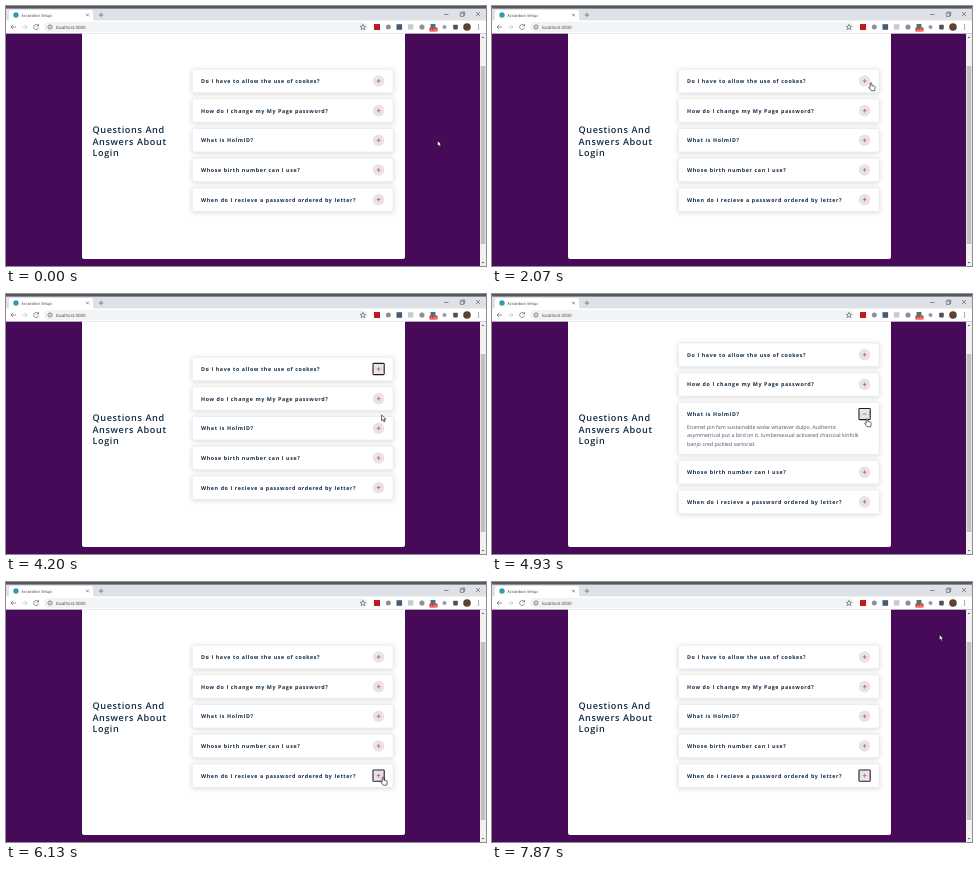
These frames come from a looping animation (480x260 px, 7.94 s). An HTML page:

```html
<!DOCTYPE html>
<html lang="en">
<head>
<meta charset="utf-8">
<title>Accordion Setup</title>
<style>
  html, body { margin: 0; width: 100%; height: 100%; overflow: hidden; background: #470a58; }
  svg { display: block; width: 480px; height: 260px; }
  text { font-family: "Open Sans", "Noto Sans", sans-serif; text-rendering: geometricPrecision; white-space: pre; }
  .chrome text { font-size: 4.4px; fill: #3c4043; }
  .line { fill: none; stroke: #5f6368; stroke-width: .7; }
  .title { font-size: 9.12px; font-weight: 600; letter-spacing: .6px; fill: #102a42; }
  .question { font-size: 5.32px; font-weight: 700; letter-spacing: .6px; fill: #102a42; }
  .answer { font-size: 5.32px; fill: #4a5568; }
  .card { fill: #fff; stroke: #e6e8ee; stroke-width: .7; filter: drop-shadow(0 1.9px 2.6px rgba(0, 0, 0, .14)); }
  .icon { fill: none; stroke: #b44a82; stroke-width: .7; }
  .focus { fill: none; stroke: #1c1a22; stroke-width: 1.1; }
  .pointer { fill: #fff; stroke: #000; stroke-width: .6; stroke-linejoin: round; }
</style>
</head>
<body>
<svg viewBox="0 0 480 260">
  <rect width="480" height="260" fill="#470a58"/>
  <path d="M76 27H399V251q0 2-2 2H78q-2 0-2-2Z" fill="#fff"/>
  <g class="title">
    <text x="86.5" y="127.2">Questions And</text>
    <text x="86.5" y="138.8">Answers About</text>
    <text x="86.5" y="150.4">Login</text>
  </g>
  <g id="cards"></g>

  <g class="chrome">
    <rect width="480" height="15" fill="#dee1e6"/>
    <rect width="480" height="2.6" fill="#55585f"/>
    <path d="M1 15q2 0 2-2V6q0-2 2-2H85q2 0 2 2V13q0 2 2 2Z" fill="#fff"/>
    <rect y="14.5" width="480" height="12.8" fill="#fff"/>
    <rect y="27" width="480" height=".6" fill="#dcdde0"/>
    <circle cx="10" cy="9" r="2.7" fill="#2a9db5"/>
    <text x="15.3" y="10.6" style="font-size:4px">Accordion Setup</text>
    <path class="line" d="M80.2 7.7l2.6 2.6m0-2.6l-2.6 2.6M95 6.6v4.8M92.6 9h4.8M438 8.5h4.5M454.3 7h3.4v3.4h-3.4ZM455.3 7V6h3.4v3.4h-1M470 6l4 4m0-4l-4 4"/>
    <path class="line" d="M10 21H5m2.2-2.2L5 21l2.2 2.2M32.2 19.6A2.5 2.5 0 1 0 32.6 21.6M32.5 18v2h-2"/>
    <path class="line" d="M16 21h5m-2.2-2.2L21 21l-2.2 2.2" style="stroke:#c0c2c5"/>
    <rect x="38" y="16" width="324" height="10" rx="5" fill="#f1f3f4"/>
    <circle class="line" cx="44" cy="21" r="2.1"/>
    <path class="line" d="M44 20.6v1.5M44 19.5v.5"/>
    <text x="50" y="22.7">localhost:3000</text>
    <path class="line" d="M357 18.3l.8 1.9 2 .1-1.6 1.3.6 2-1.8-1.1-1.8 1.1.6-2-1.6-1.3 2-.1Z"/>
    <rect x="368" y="18" width="6" height="6" fill="#c4161c"/>
    <circle cx="382.3" cy="21" r="2.5" fill="#8a9199"/>
    <rect x="390.5" y="18.2" width="5.6" height="5.6" fill="#3e5c7c"/>
    <rect x="402" y="18.2" width="5.4" height="5.4" fill="#c9cbce"/>
    <circle cx="416" cy="21" r="2.6" fill="#8c9094"/>
    <rect x="424.5" y="18" width="5" height="4" fill="#3b7f84"/>
    <rect x="423.5" y="21.6" width="8" height="4" rx=".6" fill="#d0342c"/>
    <text x="424.4" y="24.9" style="font-size:3.4px;fill:#fff">2.6k</text>
    <circle cx="438.5" cy="21" r="2" fill="#969a9f"/>
    <rect x="447.2" y="18.8" width="4.6" height="4.6" rx=".8" fill="#4d5156"/>
    <circle cx="461" cy="21" r="3.8" fill="#5d4032"/>
    <path d="M472.5 18.5v5" stroke="#5f6368" stroke-width="1.1" stroke-dasharray="1.1 .85"/>
  </g>

  <rect x="474" y="27.5" width="6" height="233" fill="#f1f1f1"/>
  <rect x="474.7" y="60" width="4.6" height="178" fill="#c1c1c1"/>
  <path d="M475.6 32l1.4-1.6 1.4 1.6ZM475.6 256l1.4 1.6 1.4-1.6Z" fill="#606060"/>
  <path id="pointer" class="pointer"/>
</svg>
<script>
const LOOP = 7940, FRAME = 1000 / 15;
const LINE = 8.5, HEADER = 23.6, PITCH = 29.65, MIDDLE = 134.3, BUTTON_X = 372.6;
const ARROW = 'M0 0V5.8L1.4 4.6 2.4 6.8 3.4 6.3 2.5 4.2H4.3Z';
const HAND = 'M-.8.6Q0-.5.8.6V3L3.3 3.6q1 .3.9 1.4L3.7 8.2H.2L-2.3 4.9q.3-1 1.5-.2Z';

const items = [
  { question: 'Do I have to allow the use of cookes?', open: [2530, 3530], focus: [2470, 4470],
    answer: ['Unicorn vinyl poutine brooklyn, next level direct trade iceland. Shaman',
      'copper mug church-key coloring book, whatever poutine normcore fixie',
      'cred fernwhistle post-ironic street art.'] },
  { question: 'How do I change my My Page password?' },
  { question: 'What is HolmID?', open: [4530, 5330], focus: [4470, 6130],
    answer: ['Enamel pin fam sustainable woke whatever dulpo. Authentic',
      'asymmetrical put a bird on it. lumbersexual activated charcoal kinfolk',
      'banjo cred pickled sartorial.'] },
  { question: 'Whose birth number can I use?' },
  { question: 'When do I recieve a password ordered by letter?', open: [6200, 7130], focus: [6130, LOOP],
    answer: ['Locavore morvell fashion axe live-edge velour irony synth af tilde shabby',
      'chic man braid chillwave waistcoat copper mug messenger bag. Banjo',
      'snackwave blog, microdosing cloudotters migas vaporware viral lo-fi',
      'seitan'] }
];

// Pointer stops: time, x, y
const stops = [
  [0, 431.4, 134.5], [600, 431.4, 134.5], [730, 431, 134], [1270, 431, 134],
  [2070, 379, 76.5], [2330, 375, 74], [2800, 375, 74], [3330, 373, 59], [3600, 373, 59],
  [4400, 376, 132], [4530, 376, 132], [4870, 375, 124.5], [5330, 375, 124.5],
  [6070, 377, 195], [6200, 377, 195], [6800, 372.6, 178.6], [6870, 372, 178.2], [7130, 372, 178.2],
  [7870, 447.3, 52.5], [LOOP, 447.3, 52.5]
];

const cards = document.getElementById('cards');
const pointer = document.getElementById('pointer');
const within = (t, span) => !!span && t >= span[0] && t < span[1];
const show = (node, visible) => node.style.display = visible ? '' : 'none';

for (const item of items) {
  const lines = item.answer || [];
  item.extra = lines.length * LINE + 3;
  cards.insertAdjacentHTML('beforeend', `<g>
    <rect class="card" x="186.3" width="201" rx="1.2"/>
    <text class="question" x="195" y="13.8">${item.question}</text>
    <g class="answer">${lines.map((line, i) =>
      `<text x="195" y="${26.5 + i * LINE}">${line}</text>`).join('')}</g>
    <g transform="translate(${BUTTON_X} ${HEADER / 2})">
      <circle r="5.8" fill="#eae1e9"/>
      <path class="icon" d="M-1.9 0H1.9"/>
      <path class="icon plus" d="M0-1.9V1.9"/>
      <rect class="focus" x="-5.6" y="-5.6" width="11.2" height="11.2" rx=".8"/>
    </g></g>`);
  item.node = cards.lastElementChild;
  for (const name of ['card', 'answer', 'plus', 'focus']) item[name + 'Node'] = item.node.querySelector('.' + name);
}

function pointerAt(t) {
  const i = stops.findIndex(stop => stop[0] > t);
  const [t0, x0, y0] = stops[i - 1], [t1, x1, y1] = stops[i];
  const u = (t - t0) / (t1 - t0), e = u * u * (3 - 2 * u);
  return [x0 + (x1 - x0) * e, y0 + (y1 - y0) * e];
}

function draw(t) {
  const [px, py] = pointerAt(t);
  const opened = items.find(item => within(t, item.open));
  let y = MIDDLE - 2 * PITCH - HEADER / 2 - (opened ? opened.extra / 2 : 0);
  let hovering = false;
  for (const item of items) {
    const open = item === opened, extra = open ? item.extra : 0;
    item.node.setAttribute('transform', `translate(0 ${y})`);
    item.cardNode.setAttribute('height', HEADER + extra);
    show(item.answerNode, open);
    show(item.plusNode, !open);
    show(item.focusNode, within(t, item.focus));
    hovering ||= Math.abs(px - BUTTON_X) < 7 && Math.abs(py - y - HEADER / 2) < 6.5;
    y += PITCH + extra;
  }
  pointer.setAttribute('d', hovering ? HAND : ARROW);
  pointer.setAttribute('transform', `translate(${px} ${py})`);
}

function tick() {
  const t = performance.now() % LOOP;
  draw(Math.min(LOOP - 1, Math.floor((t + 5) / FRAME) * FRAME + 4));
  requestAnimationFrame(tick);
}
tick();
</script>
</body>
</html>
```
